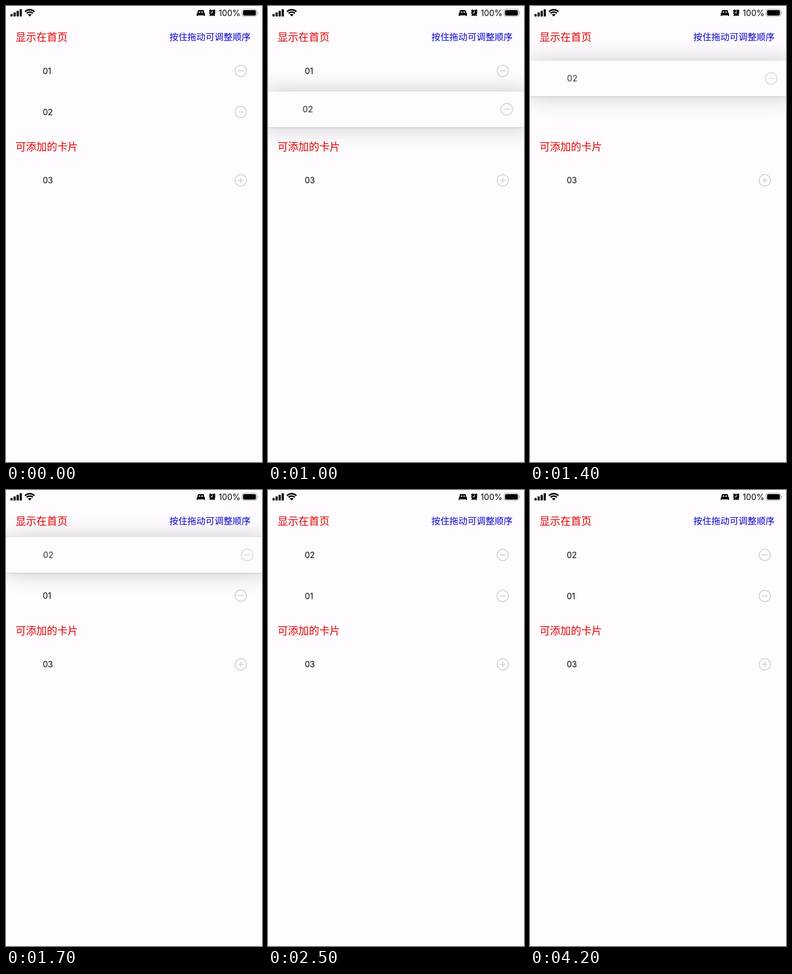
An HTML page for the animation above (5000 ms loop, 561 px wide and 998 px high).

```html
<!DOCTYPE html>
<html lang="zh-CN">
<head>
<meta charset="utf-8">
<title>卡片排序</title>
<style>
  html, body { margin: 0; width: 100%; height: 100%; overflow: hidden; background: #fefcff; }
  #stage { position: relative; width: 561px; height: 998px; overflow: hidden; }
  svg { position: absolute; left: 0; top: 0; display: block; }
  #card { position: absolute; left: 0; top: 0; width: 561px; height: 75px; }
  .num { font: 18px Inter, Roboto, sans-serif; fill: #0a0a0c; }
  .title { font: 22.8px "Noto Sans CJK SC", "Noto Sans CJK", sans-serif; fill: #e20404; }
  .hint { font: 19.8px "Noto Sans CJK SC", "Noto Sans CJK", sans-serif; fill: #0a04cc; }
  .icon { fill: none; stroke: #d1d0d4; stroke-width: 2; }
</style>
</head>
<body>
<div id="stage">
  <svg width="561" height="998" viewBox="0 0 561 998">
    <g id="bars"></g>
    <g id="wifi" transform="translate(52 23)">
      <g fill="none" stroke="#000" stroke-width="3.2">
        <path d="M-10.300 -10.500A14.500 14.500 0 0 1 10.300 -10.500"/>
        <path d="M-6.700 -7A9.500 9.500 0 0 1 6.700 -7"/>
      </g>
      <path d="M0 0L-4 -4.300A6 6 0 0 1 4 -4.300Z"/>
    </g>
    <g id="bed" transform="translate(418 9)">
      <rect x="2" width="14" height="8" rx="2.500"/>
      <path d="M4.500 4.500H8M10 4.500H13.500" stroke="#fff" stroke-width="2.400"/>
      <rect y="5.700" width="18" height="5.800" rx="2"/>
      <path d="M1 8V13M17 8V13" stroke="#000" stroke-width="2"/>
    </g>
    <g id="alarm" transform="translate(452 15)" stroke-linecap="round">
      <circle r="6.500"/>
      <path d="M-6 -4.500L-4 -6.500M6 -4.500L4 -6.500M-5 6L-3 4M5 6L3 4" stroke="#000" stroke-width="2.200"/>
      <path d="M0 -4V0H-3" fill="none" stroke="#fff" stroke-width="1.300"/>
    </g>
    <text class="num" x="466" y="22">100%</text>
    <g id="battery" transform="translate(517.500 7)">
      <rect width="32" height="16" rx="4.800" fill="none" stroke="#99989b" stroke-width="1.200"/>
      <rect x="2" y="2" width="28" height="12" rx="3"/>
      <path d="M33.500 5.500Q36.500 8 33.500 10.500Z" fill="#99989b"/>
    </g>
    <text class="title" x="21" y="76.300">显示在首页</text>
    <text class="hint" x="358" y="74.600">按住拖动可调整顺序</text>
    <text class="title" x="21" y="315.800">可添加的卡片</text>
    <g id="rows"></g>
  </svg>
  <div id="card">
    <svg width="561" height="75" viewBox="0 0 561 75">
      <g id="band">
        <rect width="561" height="75" fill="#f0f0f1"/>
        <rect x="14.400" y="5.800" width="532.200" height="63.400" rx="16" fill="#fefcff"/>
      </g>
      <g id="face" transform="translate(0 37.500)"></g>
    </svg>
  </div>
</div>
<script>
const LOOP = 5000, STEP = 100;
const TOP = 142, SECOND = 231.8, THIRD = 381.5;
const PICK_UP = 50, DROPPED = 2600;
const $ = id => document.getElementById(id);

const rowMarkup = (label, sign) => `
  <text class="num" x="80.5" y="6.8">${label}</text>
  <g class="icon" transform="translate(514.5 0)">
    <circle r="12.4"/><path d="M-6 0H6${sign === '+' ? 'M0 -6V6' : ''}"/>
  </g>`;

function addRow(label, sign) {
  const row = document.createElementNS('http://www.w3.org/2000/svg', 'g');
  row.innerHTML = rowMarkup(label, sign);
  $('rows').append(row);
  return row;
}

function place(row, y, opacity = 1) {
  row.setAttribute('transform', `translate(0 ${y})`);
  row.setAttribute('opacity', opacity);
}

const mix = (a, b, k) => a + (b - a) * k;

// Smooth rise from 0 to 1 between two times.
function ease(t, from, to) {
  const k = Math.min(1, Math.max(0, (t - from) / (to - from)));
  return k * k * (3 - 2 * k);
}

for (let i = 0; i < 4; i++) {
  const h = 5.5 + 3.5 * i;
  $('bars').innerHTML += `<rect x="${9.8 + 6.7 * i}" y="${23 - h}" width="4.8" height="${h}" rx="1.3"/>`;
}
$('face').innerHTML = rowMarkup('02', '-');

const first = addRow('01', '-'), second = addRow('02', '-');
place(addRow('03', '+'), THIRD);

function draw(t) {
  const settled = t >= DROPPED;
  const held = t > PICK_UP && !settled;
  place(first, mix(TOP, SECOND, ease(t, 1280, 1720)));
  place(second, settled ? TOP : SECOND, settled ? 1 : 1 - ease(t, 1000, 1345));
  $('card').style.display = held ? 'block' : 'none';
  if (held) drawCard(t);
}

function drawCard(t) {
  const lift = ease(t, PICK_UP, 550);
  const grip = ease(t, 900, 1250);
  const drop = ease(t, 1900, 2400);
  const y = mix(SECOND, TOP, ease(t, 890, 1590));
  const dx = 6.8 * grip * (1 - drop) ** 2;
  const scale = 1 + 0.031 * lift * (1 - drop);
  const shadow = ease(t, PICK_UP, 400) * (1 - ease(t, 2000, 2500));
  const band = ease(t, PICK_UP, 400) * (1 - ease(t, 400, 600));
  const ink = 1 - 0.14 * grip * (1 - drop) - 0.25 * Math.sin(Math.PI * drop);

  const style = $('card').style;
  style.transform = `translate(${dx}px, ${y - 37.5}px) scale(${scale})`;
  style.background = `rgba(254, 252, 255, ${1 - 0.05 * grip})`;
  style.boxShadow = `0 1px 50px rgba(0, 0, 0, ${0.21 * shadow}), 0 1px 4px rgba(0, 0, 0, ${0.14 * shadow})`;
  $('band').setAttribute('opacity', band);
  $('face').setAttribute('opacity', ink);
}

const start = performance.now();
function tick() {
  const t = (performance.now() - start) % LOOP;
  draw(Math.floor(t / STEP) * STEP);
  requestAnimationFrame(tick);
}
tick();
</script>
</body>
</html>
```
